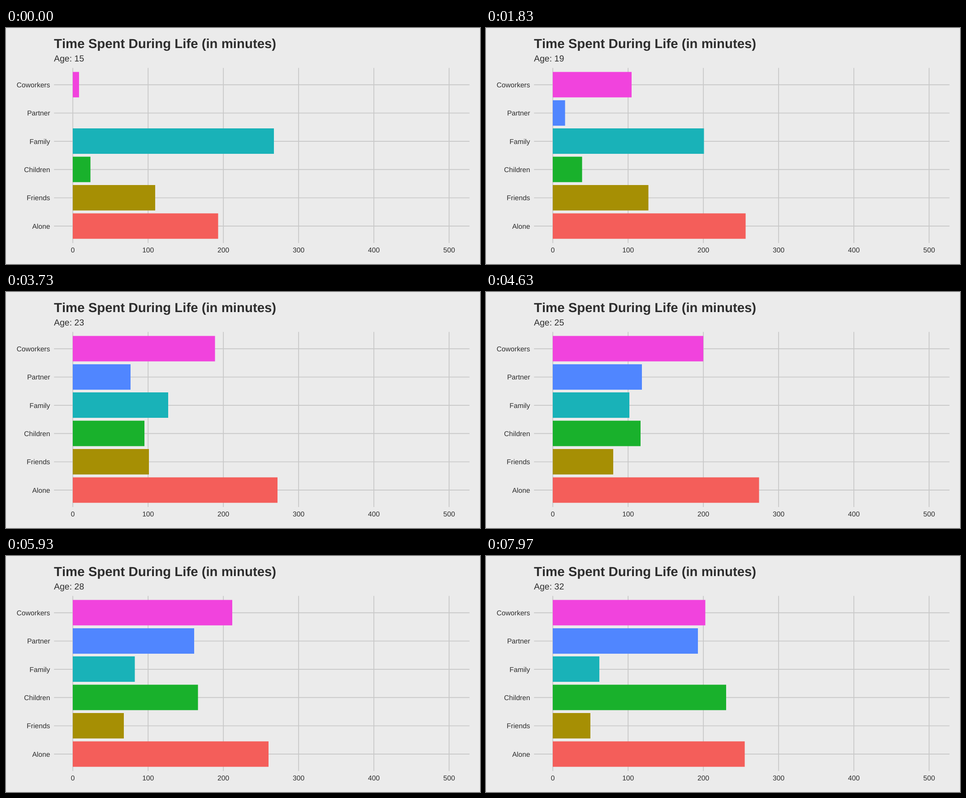
These frames come from a looping animation (1058x529 px, 8 s). An HTML page:

```html
<!DOCTYPE html>
<html lang="en">
<head>
<meta charset="utf-8">
<title>Time Spent During Life</title>
<style>
  html, body { margin: 0; width: 100%; height: 100%; overflow: hidden; background: #ebebeb; }
  svg { display: block; width: 1058px; height: 529px; }
  text {
    font: 15.62px "Liberation Sans", Arial, sans-serif;
    font-kerning: none;
    text-rendering: geometricPrecision;
    fill: #2d2d2d;
  }
  .title { font-size: 29.38px; font-weight: bold; }
  .age { font-size: 19.52px; }
  .label { text-anchor: end; }
  .tick { text-anchor: middle; }
  line { stroke: #c9c9c9; stroke-width: 1.9; }
</style>
</head>
<body>
<svg id="chart" viewBox="0 0 1058 529">
  <text class="title" x="107" y="45">Time Spent During Life (in minutes)</text>
  <text class="age" id="age" x="107" y="75.4">Age: 15</text>
</svg>
<script>
const LOOP = 8000, FPS = 30, FRAMES_PER_YEAR = 14.05, FIRST_AGE = 15;
const LEFT = 107.2, RIGHT = 1034.6, TOP = 89.4, BOTTOM = 482.1;
const ZERO = 149.2, PX_PER_MIN = 1.6797;
const FIRST_ROW = 127.25, PITCH = 63.35, BAR = 57;

// Minutes at a few key frames; a smooth curve joins them
const keys = [0, 35, 76, 98, 112, 139, 155, 178, 239];
const rows = [
  ['Coworkers', '#f143dd', [8.5, 62.7, 147.8, 177, 189, 200.2, 206.5, 212.1, 202.6]],
  ['Partner', '#5086ff', [0, 3.5, 38.6, 63, 76.7, 118.4, 138, 161.4, 192.8]],
  ['Family', '#19b2b8', [267.2, 233.1, 166, 142, 126.7, 101.7, 92, 82.6, 61.8]],
  ['Children', '#19b12c', [23.5, 26.7, 60, 82, 95.2, 116.6, 137, 166.3, 230.3]],
  ['Friends', '#a68f04', [109.6, 129.1, 122.5, 109, 101.1, 80.5, 74, 67.8, 49.9]],
  ['Alone', '#f45e5a', [193.2, 233.4, 275.1, 283.8, 272, 274.1, 281.8, 260.3, 255.1]]
];

const chart = document.getElementById('chart');
const ageText = document.getElementById('age');

function add(tag, attrs, text) {
  const el = document.createElementNS(chart.namespaceURI, tag);
  for (const key in attrs) el.setAttribute(key, attrs[key]);
  if (text !== undefined) el.textContent = text;
  return chart.appendChild(el);
}

const rowY = i => FIRST_ROW + i * PITCH;
const minX = minutes => ZERO + minutes * PX_PER_MIN;
const snap = v => Math.floor(v * 2) / 2;

// Monotone cubic: the slope at a key is the harmonic mean of its neighbours, flat at peaks
const secant = (v, i) => (v[i + 1] - v[i]) / (keys[i + 1] - keys[i]);
function slope(v, i) {
  if (i === 0) return secant(v, 0);
  if (i === keys.length - 1) return secant(v, i - 1);
  const a = secant(v, i - 1), b = secant(v, i);
  return a * b > 0 ? 2 * a * b / (a + b) : 0;
}
function curve(v, frame) {
  const i = Math.max(0, keys.findIndex(k => k >= frame) - 1);
  const span = keys[i + 1] - keys[i], s = (frame - keys[i]) / span, r = 1 - s;
  return v[i] * r * r * (1 + 2 * s) + v[i + 1] * s * s * (1 + 2 * r)
    + span * s * r * (slope(v, i) * r - slope(v, i + 1) * s);
}

rows.forEach(([name], i) => {
  add('line', { x1: LEFT, x2: RIGHT, y1: rowY(i), y2: rowY(i) });
  add('text', { class: 'label', x: 98.4, y: rowY(i) + 5.65 }, name);
});
for (let min = 0; min <= 500; min += 100) {
  const x = minX(min);
  add('line', { x1: x, x2: x, y1: TOP, y2: BOTTOM });
  add('text', { class: 'tick', x, y: 502.9 }, min);
}
const bars = rows.map(([, fill], i) =>
  add('rect', { x: snap(ZERO), y: snap(rowY(i) - BAR / 2), width: 0, height: BAR, fill }));

function draw(now) {
  const frame = Math.floor((now % LOOP + 4) * FPS / 1000) % (LOOP * FPS / 1000);
  ageText.textContent = 'Age: ' + Math.round(FIRST_AGE + frame / FRAMES_PER_YEAR);
  rows.forEach(([, , minutes], i) =>
    bars[i].setAttribute('width', snap(minX(curve(minutes, frame))) - snap(ZERO)));
}

const start = performance.now();
function tick() {
  draw(performance.now() - start);
  requestAnimationFrame(tick);
}
tick();
</script>
</body>
</html>
```
